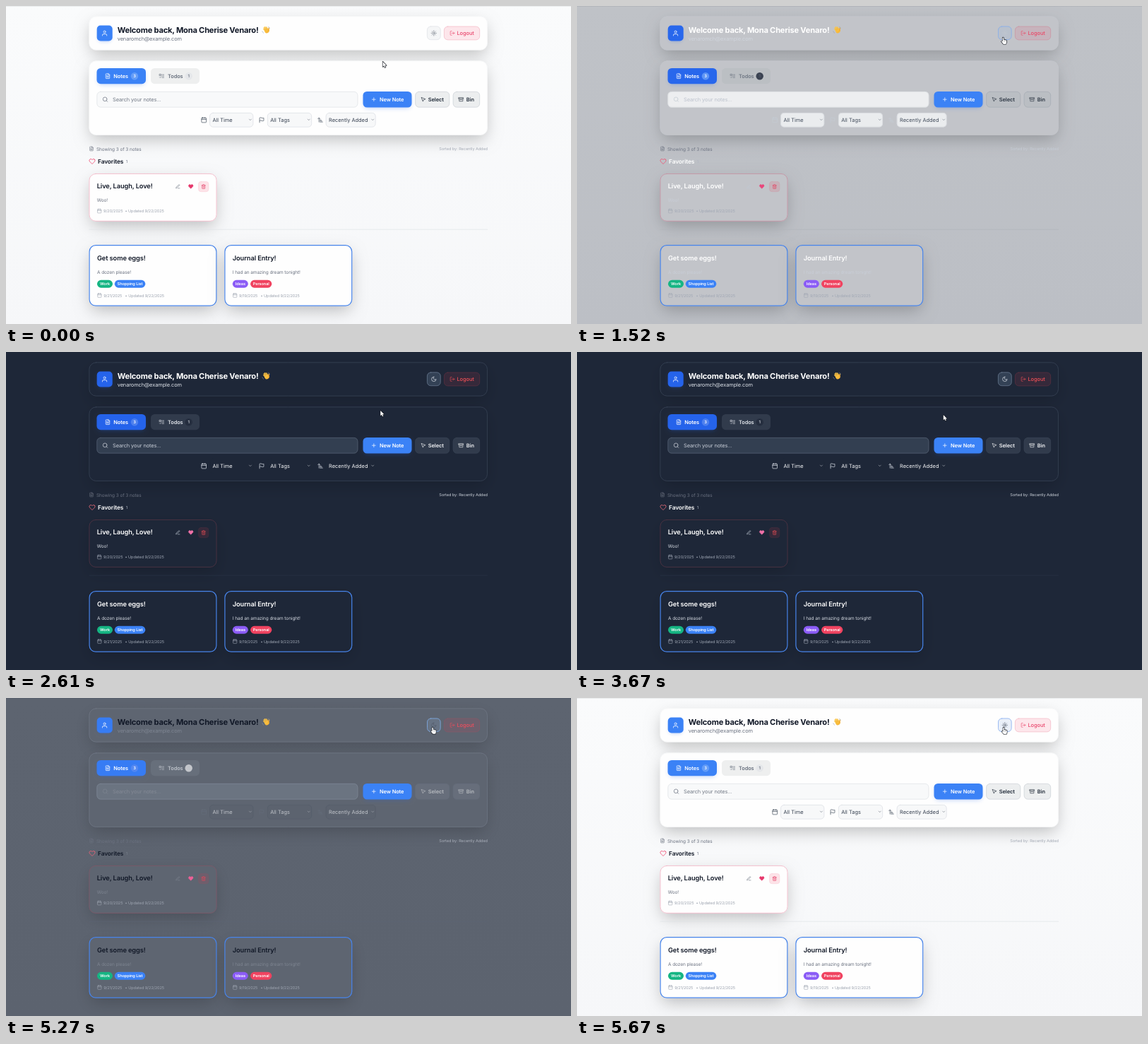
Write an HTML page with a canvas that moves like this. It is 800x450 px and loops after 5790 ms.

```html
<!DOCTYPE html>
<html lang="en">
<head>
<meta charset="utf-8">
<title>Notes theme toggle</title>
<style>
html, body { margin: 0; width: 100%; height: 100%; overflow: hidden; background: #f8f9fa; }
canvas { display: block; width: 800px; height: 450px; }
</style>
</head>
<body>
<canvas id="stage"></canvas>
<script>
const LOOP = 5790, TO_DARK = 1429, TO_LIGHT = 5190;
const canvas = document.getElementById('stage');
const ctx = canvas.getContext('2d');
const dpr = window.devicePixelRatio || 1;
canvas.width = 800 * dpr;
canvas.height = 450 * dpr;

// Icon paths on a 24 unit grid
const ICONS = {
  user: 'M20 21v-2a4 4 0 0 0-4-4H8a4 4 0 0 0-4 4v2M16 7a4 4 0 1 1-8 0a4 4 0 1 1 8 0',
  file: 'M15 2H6a2 2 0 0 0-2 2v16a2 2 0 0 0 2 2h12a2 2 0 0 0 2-2V7zM14 2v6h6M10 9H8M16 13H8M16 17H8',
  todo: 'M3 4h6v6H3zM3 17l2 2 4-4M13 6h8M13 12h8M13 18h8',
  search: 'M19 11a8 8 0 1 1-16 0a8 8 0 1 1 16 0M21 21l-4.3-4.3',
  plus: 'M5 12h14M12 5v14',
  pointer: 'M4 4l7 17 2.5-7.5L21 11z',
  bin: 'M2 4h20v5H2zM4 9v11h16V9M10 13h4',
  calendar: 'M5 4h14a2 2 0 0 1 2 2v14a2 2 0 0 1-2 2H5a2 2 0 0 1-2-2V6a2 2 0 0 1 2-2zM16 2v4M8 2v4M3 10h18',
  flag: 'M4 22V4s1-1 4-1 5 2 8 2 4-1 4-1v11s-1 1-4 1-5-2-8-2-4 1-4 1',
  sort: 'M3 8l4-4 4 4M7 4v16M11 12h4M11 16h7M11 20h10',
  heart: 'M20.8 4.6a5.5 5.5 0 0 0-7.8 0L12 5.7l-1-1.1a5.5 5.5 0 0 0-7.8 7.8L12 21.2l8.8-8.8a5.5 5.5 0 0 0 0-7.8z',
  pen: 'M12 20h9M16.5 3.5a2.1 2.1 0 0 1 3 3L7 19l-4 1 1-4z',
  trash: 'M3 6h18M19 6v14a2 2 0 0 1-2 2H7a2 2 0 0 1-2-2V6M8 6V4a2 2 0 0 1 2-2h4a2 2 0 0 1 2 2v2M10 11v6M14 11v6',
  logout: 'M9 21H5a2 2 0 0 1-2-2V5a2 2 0 0 1 2-2h4M16 17l5-5-5-5M21 12H9',
  sun: 'M16 12a4 4 0 1 1-8 0a4 4 0 1 1 8 0M12 2v2M12 20v2M4.9 4.9l1.4 1.4M17.7 17.7l1.4 1.4M2 12h2M20 12h2M6.3 17.7l-1.4 1.4M19.1 4.9l-1.4 1.4',
  moon: 'M12 3a6 6 0 0 0 9 9 9 9 0 1 1-9-9z',
  chevron: 'M5 8l7 7 7-7'
};
for (const name in ICONS) ICONS[name] = new Path2D(ICONS[name]);
const ARROW = new Path2D('M0 0V7.3L1.7 5.8 2.8 8.3 4 7.8 2.9 5.4H5.2Z');
const HAND = new Path2D('M-.2 .7Q.6-.4 1.3.7V3.6Q2.1 2.9 2.7 3.8 3.4 3.2 4 4.1 5 3.6 5.3 4.7V7Q5.2 8.5 4.4 9.6H.9Q-.1 8.2-1.8 6.3-2 5.2-1 5.3L-.2 6Z');

// cubic-bezier(.4, 0, .2, 1)
function ease(x) {
  if (x <= 0) return 0;
  if (x >= 1) return 1;
  let lo = 0, hi = 1;
  for (let i = 0; i < 20; i++) {
    const s = (lo + hi) / 2, r = 1 - s;
    if (1.2 * s * r * r + 0.6 * s * s * r + s * s * s < x) lo = s; else hi = s;
  }
  return lo * lo * (3 - 2 * lo);
}

const clamp = x => Math.max(0, Math.min(1, x));
const smooth = x => { x = clamp(x); return x * x * (3 - 2 * x); };
const lerp = (a, b, k) => a + (b - a) * k;

function mix(a, b, k) {
  const ch = (s, i) => parseInt(s.slice(i, i + 2), 16);
  return 'rgb(' + [1, 3, 5].map(i => Math.round(lerp(ch(a, i), ch(b, i), k))).join(',') + ')';
}

function box(x, y, w, h, r, fill, stroke, lw = 0.7) {
  ctx.beginPath();
  ctx.roundRect(x, y, w, h, r);
  ctx.fillStyle = fill;
  ctx.fill();
  if (!stroke) return;
  ctx.beginPath();
  ctx.roundRect(x + lw / 2, y + lw / 2, w - lw, h - lw, r - lw / 2);
  ctx.strokeStyle = stroke;
  ctx.lineWidth = lw;
  ctx.stroke();
}

function shadow(x, y, w, h, r, inset, dy, blur, color) {
  ctx.save();
  ctx.shadowColor = color;
  ctx.shadowBlur = blur * dpr;
  ctx.shadowOffsetY = dy * dpr;
  box(x + inset, y + inset, w - inset * 2, h - inset * 2, r, '#777');
  ctx.restore();
}

// y is the middle of the capitals
function text(str, x, y, size, color, weight = 400, track = -0.011, align = 'left') {
  ctx.font = `${weight} ${size}px Inter, sans-serif`;
  ctx.letterSpacing = track * size + 'px';
  ctx.textAlign = align;
  ctx.fillStyle = color;
  ctx.fillText(str, x, y + size * 0.364);
}

function icon(name, x, y, size, color, fill, turn = 0) {
  ctx.save();
  ctx.translate(x, y);
  ctx.rotate(turn);
  ctx.scale(size / 24, size / 24);
  ctx.translate(-12, -12);
  ctx.lineWidth = 2;
  ctx.strokeStyle = color;
  ctx.stroke(ICONS[name]);
  if (fill) { ctx.fillStyle = fill; ctx.fill(ICONS[name]); }
  ctx.restore();
}

function dot(x, y, r, color) {
  ctx.beginPath();
  ctx.arc(x, y, r, 0, 7);
  ctx.fillStyle = color;
  ctx.fill();
}

function line(x1, y1, x2, y2, color, lw) {
  ctx.beginPath();
  ctx.moveTo(x1, y1);
  ctx.lineTo(x2, y2);
  ctx.strokeStyle = color;
  ctx.lineWidth = lw;
  ctx.stroke();
}

function wave(x, y) {
  ctx.save();
  ctx.translate(x, y);
  ctx.rotate(-0.6);
  ctx.fillStyle = '#f8b93a';
  ctx.beginPath();
  ctx.ellipse(0.3, 2, 3.3, 3.2, 0, 0, 7);
  ctx.fill();
  [[-2, -2.7], [-0.5, -4], [1.1, -4], [2.7, -2.6]].forEach(([fx, fy]) =>
    line(fx * 0.9, 1.5, fx, fy, '#fbc547', 1.45));
  line(2.6, 3, 4.8, 0.4, '#f2a92f', 1.5);
  [-1.2, 0.3, 1.9].forEach(fx => line(fx, -1.8, fx, 0.7, '#d98f24', 0.3));
  ctx.restore();
  ctx.lineWidth = 0.6;
  ctx.strokeStyle = '#8d99a8';
  for (const a of [-0.9, 2.2]) {
    ctx.beginPath();
    ctx.arc(x, y, 5.7, a, a + 0.5);
    ctx.stroke();
  }
}

function cursorAt(t) {
  if (t < 2100) {
    const k = smooth((t - 480) / 550);
    return [lerp(533.5, 602.8, k), lerp(78.8, 44.3, k)];
  }
  if (t < 4100) {
    const k = smooth((t - 2150) / 600);
    return [lerp(602.8, 518.8, k), lerp(44.3, 89, k)];
  }
  const k = smooth((t - 4180) / 560), late = smooth((t - 5230) / 90);
  return [lerp(518.8, 603.5, k), lerp(89, 41, k) + late * 0.6];
}

function cursor([x, y], hand) {
  ctx.save();
  ctx.translate(x, y);
  const shape = hand ? HAND : ARROW;
  ctx.lineWidth = 1.3;
  ctx.strokeStyle = '#161a22';
  ctx.stroke(shape);
  ctx.fillStyle = '#fff';
  ctx.fill(shape);
  if (hand) for (const fx of [1.4, 2.7, 3.9]) line(fx, 4.2, fx, 6, '#777', 0.3);
  ctx.restore();
}

function draw(t) {
  const slow = ease((t - TO_DARK) / 350) - ease((t - TO_LIGHT) / 300);
  const late = ease((t - TO_DARK - 45) / 330) - ease((t - TO_LIGHT) / 300);
  const fast = ease((t - TO_DARK) / 150) - ease((t - TO_LIGHT) / 150);
  const hard = t >= TO_DARK + 45 && t < TO_LIGHT + 60 ? 1 : 0;
  const S = (a, b) => mix(a, b, slow);
  const L = (a, b) => mix(a, b, late);
  const F = (a, b) => mix(a, b, fast);
  const H = (a, b) => hard ? b : a;

  ctx.setTransform(dpr, 0, 0, dpr, 0, 0);
  ctx.lineCap = ctx.lineJoin = 'round';
  ctx.textRendering = 'geometricPrecision';

  const bg = ctx.createLinearGradient(0, 0, 0, 450);
  bg.addColorStop(0, S('#fafbfc', '#1e2738'));
  bg.addColorStop(1, S('#f6f7f9', '#1e2738'));
  ctx.fillStyle = bg;
  ctx.fillRect(0, 0, 800, 450);
  ctx.fillStyle = S('#e9ebed', '#1e2738');
  ctx.fillRect(0, 0, 800, 1);

  const shade = `rgba(0,0,0,${lerp(0.24, 0.17, slow)})`;
  const face = S('#fefefe', '#1e2738');
  const card = (x, y, w, h, r, edge, lw) => {
    shadow(x, y, w, h, r, 2.5, 8.5, 22, shade);
    box(x, y, w, h, r, face, edge, lw);
  };
  const title = H('#111827', '#ffffff');
  const body = F('#6b7280', '#d5dae2');
  const faint = F('#9ca3af', '#a0a8b5');
  const blue = F('#3b82f6', '#2563eb');
  const pos = cursorAt(t);
  const over = pos[0] > 596 && pos[0] < 616 && pos[1] > 28 && pos[1] < 48;

  // Header
  const edge = S('#f4f5f6', '#3c475a');
  card(117.5, 14.5, 564.3, 48, 10, edge);
  shadow(128.7, 27.5, 22, 22, 5, 1.5, 2.5, 5, 'rgba(37,99,235,.28)');
  box(128.7, 27.5, 22, 22, 5, blue);
  icon('user', 139.6, 38.5, 9.3, '#fff');
  text('Welcome back, Mona Cherise Venaro!', 157.7, 33.6, 11.13, title, 700, -0.018);
  wave(368, 33.6);
  text('venaromch@example.com', 157.7, 46, 7.42, F('#6b7280', '#dde2e9'));

  const rim = over ? S('#9dbcf3', '#6a94c4') : S('#e2e5e9', '#64748b');
  box(596, 28.5, 19.6, 19.6, 5.5, S(over ? '#eaf0f9' : '#f5f6f7', '#334155'), rim, over ? 1 : 0.8);
  const since = t >= TO_LIGHT ? t - TO_LIGHT : t - TO_DARK;
  const out = smooth((since - 75) / 90), into = smooth((since - 150) / 100);
  const sunAlpha = t < TO_DARK ? 1 : t < TO_LIGHT ? 1 - out : into;
  const moonAlpha = t < TO_DARK ? 0 : t < TO_LIGHT ? into : 1 - out;
  const glyph = over ? F('#374151', '#d5dae2') : F('#5f6774', '#d5dae2');
  ctx.globalAlpha = sunAlpha;
  icon('sun', 605.8, 38.4, 8.6, glyph, null, (1 - sunAlpha) * 1.5);
  ctx.globalAlpha = moonAlpha;
  icon('moon', 605.8, 38.4, 8.6, glyph, null, (moonAlpha - 1) * 1.5);
  ctx.globalAlpha = 1;

  box(620, 28.7, 51, 19.5, 5.5, S('#fde6eb', '#35293a'), S('#f3bac7', '#5b3040'));
  const red = S('#e9486e', '#ee5056');
  icon('logout', 632, 38.4, 7.6, red);
  text('Logout', 638.5, 38.6, 7.42, red, 500);

  // Toolbar
  card(117.5, 77.5, 564.3, 105.3, 10, edge);
  shadow(128.5, 88, 69.5, 22.2, 5.5, 1.5, 2.5, 6, 'rgba(37,99,235,.28)');
  box(128.5, 88, 69.5, 22.2, 5.5, blue);
  icon('file', 144, 99.2, 8.2, '#fff');
  text('Notes', 152.2, 99.3, 7.42, '#fff', 600);
  dot(182, 99.2, 5.2, S('#649df8', '#4d80ee'));
  text('3', 182, 99.3, 5.8, '#fff', 600, 0, 'center');

  const tab = L('#68707e', '#e0e4ea');
  box(205, 88, 69, 22.2, 5.5, S('#eeefef', '#313b4c'));
  icon('todo', 220.5, 99.2, 8.2, tab);
  text('Todos', 229, 99.3, 7.42, tab, 600);
  dot(258.7, 99.2, 5.2, F('#e5e7ea', '#252e3f'));
  text('1', 258.7, 99.3, 5.8, L('#596170', '#e0e4ea'), 500, 0, 'center');

  box(128.5, 121, 369.8, 22.5, 5.5, L('#f8f9fa', '#333f51'), L('#dfe2e6', '#566275'));
  icon('search', 140.5, 132.2, 8.6, F('#6b7280', '#d1d6de'));
  text('Search your notes...', 151, 132.4, 7.42, F('#747b87', '#c6ccd6'));

  shadow(505.5, 121, 69, 22.5, 5.5, 1.5, 2.5, 6, 'rgba(37,99,235,.28)');
  box(505.5, 121, 69, 22.5, 5.5, '#3b82f6');
  icon('plus', 520.8, 132.2, 8.2, '#fff');
  text('New Note', 529, 132.4, 7.42, '#fff', 600);

  const ink = L('#1f2937', '#f3f4f6');
  const btn = (x, w, name, ix, label, tx) => {
    box(x, 121, w, 22.5, 5.5, S('#eceeef', '#313b4c'), S('#cfd3d8', '#374254'));
    icon(name, ix, 132.2, 7.6, ink);
    text(label, tx, 132.4, 7.42, ink, 600);
  };
  btn(579.3, 48.8, 'pointer', 590.7, 'Select', 597.8);
  btn(632.8, 38.2, 'bin', 644.3, 'Bin', 651.8);

  const drop = (name, ix, x, w, label) => {
    icon(name, ix, 161.2, 8.8, F('#4b5563', '#d5dae2'));
    box(x, 151, w, 20.5, 5, L('#f7f8f9', '#1e2738'), L('#dcdfe4', '#1f2939'));
    text(label, x + 4.2, 161.3, 7.42, L('#374151', '#f6f7f9'), 400, 0);
    icon('chevron', x + w - 4.3, 161, 5.2, L('#374151', '#f6f7f9'));
  };
  drop('calendar', 280.2, 288.2, 62, 'All Time');
  drop('flag', 362, 370, 63, 'All Tags');
  drop('sort', 445, 452.8, 70.7, 'Recently Added');

  // Summary
  icon('file', 121, 202, 7, '#6b7280');
  text('Showing 3 of 3 notes', 128, 202.2, 6.49, '#6b7280');
  text('Sorted by: Recently Added', 613.2, 202, 5.57, F('#a3a9b4', '#cbd1d9'));
  icon('heart', 122, 220, 9.3, S('#f0406a', '#f5707c'));
  text('Favorites', 130, 220.3, 8.35, title, 600);
  text('1', 169.7, 220.1, 5.57, F('#6b7280', '#b8bfca'));

  const dates = (x, y, made) => {
    icon('calendar', x + 3.2, y - 0.2, 7, faint);
    text(made, x + 9, y, 5.57, faint);
    text('• Updated 9/22/2025', x + 39.4, y, 5.57, faint);
  };

  // Favorite note
  card(117.5, 237, 181, 67.8, 9.5, S('#f2b8c8', '#4d3342'), 0.9);
  text('Live, Laugh, Love!', 128.7, 254.7, 9.28, title, 600);
  icon('pen', 243.3, 255.5, 7.2, F('#6b7280', '#cbd3de'));
  const pink = S('#e6366b', '#f071a8');
  icon('heart', 261.7, 255.5, 7.4, pink, pink);
  box(272.3, 248.2, 14.8, 14.8, 4, S('#fde3e8', '#36293a'), S('#f8cfd8', '#452f3e'), 0.5);
  icon('trash', 279.7, 255.6, 7, S('#e23660', '#ee5056'));
  text('Woo!', 128.7, 275, 6.49, body);
  dates(129, 290.2, '9/20/2025');
  line(118, 316.2, 681.7, 316.2, S('#e0e2e6', '#293345'), 0.7);

  // Other notes
  const note = (x, name, line1, made, tags) => {
    card(x, 338, 181, 86.8, 9.5, '#4784ea', 1.2);
    text(name, x + 11.5, 356.2, 9.28, title, 600);
    text(line1, x + 11.5, 376.6, 6.49, body);
    for (const [dx, w, label, color] of tags) {
      box(x + dx, 387.8, w, 10.9, 5.4, color);
      text(label, x + dx + w / 2, 393.4, 5.57, '#fff', 600, -0.011, 'center');
    }
    dates(x + 11.7, 409.6, made);
  };
  note(117.5, 'Get some eggs!', 'A dozen please!', '9/21/2025',
    [[11.5, 22, 'Work', '#15b583'], [36.3, 43.5, 'Shopping List', '#3b82f6']]);
  note(309.3, 'Journal Entry!', 'I had an amazing dream tonight!', '9/19/2025',
    [[11.5, 22, 'Ideas', '#8b5cf6'], [36.8, 30.2, 'Personal', '#f04360']]);

  cursor(pos, over);
}

const start = performance.now();
function frame() {
  draw((performance.now() - start) % LOOP);
  requestAnimationFrame(frame);
}
frame();
</script>
</body>
</html>
```
